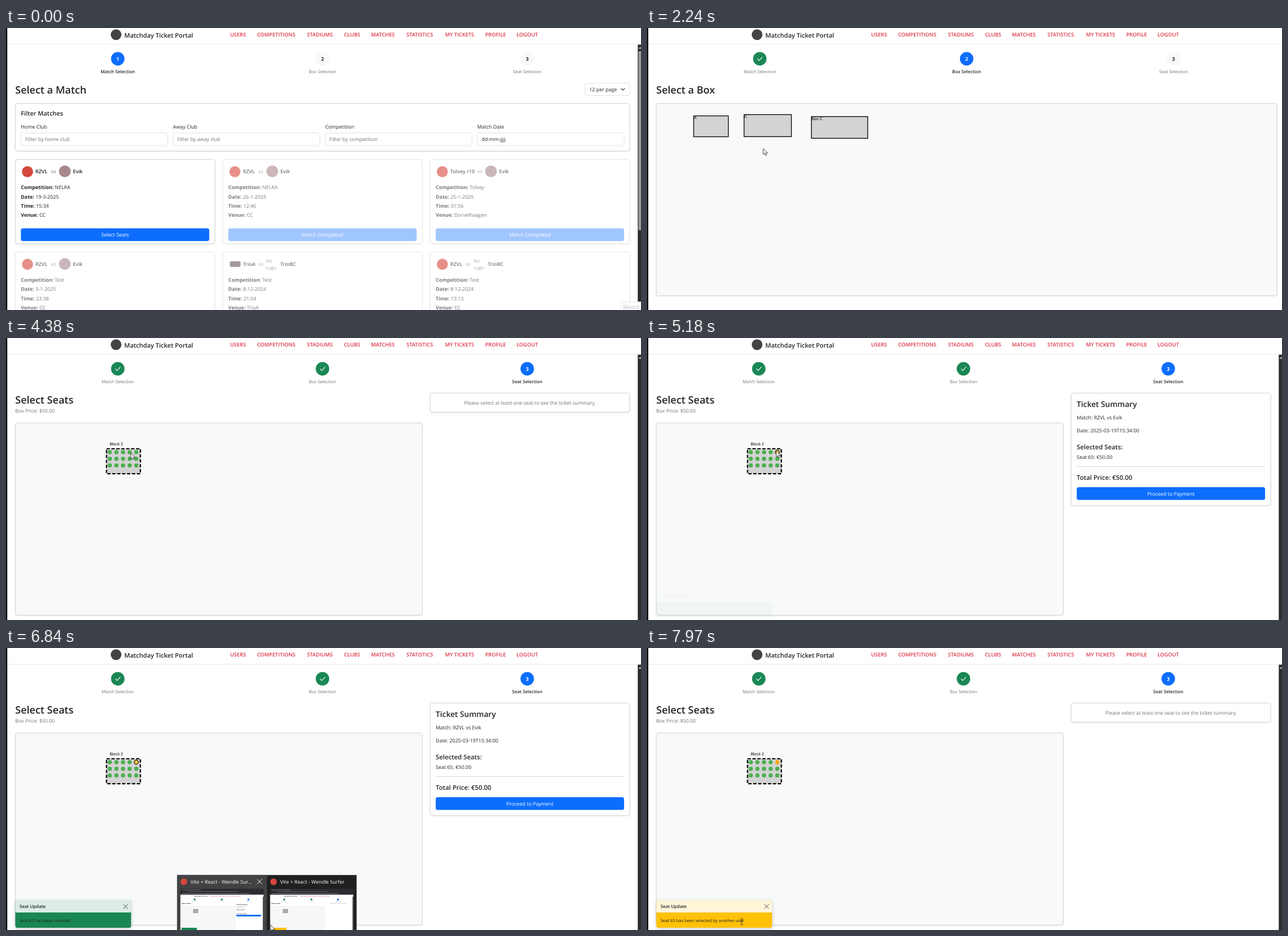
These frames come from a looping animation (1122 by 499 pixels, 8000 ms). An HTML page:

```html
<!DOCTYPE html>
<html lang="en">
<head>
<meta charset="utf-8">
<title>Ticket booking</title>
<style>
html, body { margin: 0; width: 100%; height: 100%; overflow: hidden; background: #fff; }
svg { display: block; width: 1122px; height: 499px; }
text { font: 8.9px "Open Sans", "Noto Sans", sans-serif; fill: #212529; text-rendering: geometricPrecision; white-space: pre; }
.m { text-anchor: middle; }
.sb { font-weight: 600; }
.b { font-weight: 700; }
.mute { fill: #6c757d; }
.white { fill: #fff; }
.nav { font-weight: 600; fill: #dc3545; }
.arial { font-family: "Liberation Sans", Arial, sans-serif; fill: #000; }
.card { fill: #fff; stroke: #d3d5d7; filter: drop-shadow(0 1px 1px rgba(0, 0, 0, .09)); }
.field { fill: #fff; stroke: #dee2e6; }
.line { fill: none; stroke-linecap: round; stroke-linejoin: round; }
.blue { fill: #0d6efd; }

/* One loop is 8 s, so 1% = 80 ms */
.step { animation: 8s step-end infinite; opacity: 0; }
.flow { animation: 8s linear infinite; }
.hint { animation-name: hint; }
.list { animation-name: list; }
.boxes { animation-name: boxes; }
.areas { animation-name: areas; }
.seats { animation-name: seats; }
.empty { animation-name: empty; }
.summary { animation-name: summary; }
.other { animation-name: other; }
.toast { opacity: 0; animation-name: toast; }
.hover { animation-name: hover; }
.pick { animation: pick 8s step-end infinite; }
.peek { opacity: 0; animation-name: peek; }
.left-on { animation-name: leftOn; }
.right-on { animation-name: rightOn; }
.pointer { animation-name: pointer; }
.path { animation-name: path; }
.arrow { animation-name: arrow; }
.hand { animation-name: hand; }
.beam { animation-name: beam; }

@keyframes hint { 0% { opacity: 1 } .875% { opacity: 0 } }
@keyframes list { 0% { opacity: 1 } 22.25% { opacity: 0 } }
@keyframes boxes { 22.25% { opacity: 1 } 38% { opacity: 0 } }
@keyframes areas { 23.125% { opacity: 1 } }
@keyframes seats { 38% { opacity: 1 } }
@keyframes empty { 0% { opacity: 1 } 64.75% { opacity: 0 } 87.875% { opacity: 1 } }
@keyframes summary { 64.75% { opacity: 1 } 87.875% { opacity: 0 } }
@keyframes other { 87.875% { opacity: 1 } }
@keyframes toast { 0%, 64.7% { opacity: 0 } 66.375%, 87.87% { opacity: 1 } 87.875%, 100% { opacity: 0 } }
@keyframes hover { 0%, 12.5% { fill: #0d6efd } 14.4%, 100% { fill: #0b5ed7 } }
@keyframes pick {
  0% { fill: #4caf50; stroke: none }
  64.75% { fill: #ffc833; stroke: #111 }
  87.875% { fill: #ffa500; stroke: none }
}
@keyframes peek {
  0%, 77.12% { opacity: 0; transform: translateY(10px) }
  77.125% { opacity: .38; transform: translateY(10px) }
  79.5%, 87.87% { opacity: 1; transform: none }
  87.875%, 100% { opacity: 0; transform: none }
}
@keyframes leftOn { 81% { opacity: 1 } 86.3% { opacity: 0 } }
@keyframes rightOn { 86.3% { opacity: 1 } }
@keyframes pointer { 4% { opacity: 1 } 65.625% { opacity: 0 } 80.5% { opacity: 1 } }
@keyframes arrow { 0% { opacity: 1 } 12.5% { opacity: 0 } 23.125% { opacity: 1 } 98.7% { opacity: 0 } }
@keyframes hand { 12.5% { opacity: 1 } 23.125% { opacity: 0 } }
@keyframes beam { 98.7% { opacity: 1 } }
@keyframes path {
  0%, 4% { transform: translate(972px, 462px) }
  4.75% { transform: translate(720px, 415px) }
  5.6%, 9% { transform: translate(531px, 370px) }
  11% { transform: translate(440px, 378px) }
  13% { transform: translate(330px, 373px) }
  16.3%, 27.1% { transform: translate(276px, 361px) }
  27.125% { transform: translate(240px, 285px) }
  28% { transform: translate(205.5px, 213.5px) }
  30% { transform: translate(196px, 199px) }
  32.5% { transform: translate(186px, 186px) }
  36.2%, 38% { transform: translate(185px, 176px) }
  50.6%, 53% { transform: translate(201px, 192px) }
  54.75% { transform: translate(220.5px, 203.5px) }
  63%, 72% { transform: translate(228.5px, 200px) }
  80% { transform: translate(400px, 497px) }
  82.5% { transform: translate(425px, 479px) }
  84% { transform: translate(450px, 484px) }
  85.5% { transform: translate(467.5px, 490px) }
  87.1%, 92% { transform: translate(474px, 487px) }
  93.5% { transform: translate(440px, 380px) }
  95% { transform: translate(380px, 311px) }
  97% { transform: translate(280px, 370px) }
  98.5% { transform: translate(190px, 470px) }
  99.6%, 100% { transform: translate(167.5px, 484.5px) }
}
</style>
</head>
<body>
<svg id="stage" viewBox="0 0 1122 499"></svg>
<script>
const text = (x, y, s, cls = '', size = 8.9) =>
  `<text x="${x}" y="${y}" class="${cls}" style="font-size:${size}px">${s}</text>`;
const rect = (x, y, w, h, attrs = '', r = 0) =>
  `<rect x="${x}" y="${y}" width="${w}" height="${h}" rx="${r}" ${attrs}/>`;
const circle = (x, y, r, attrs) => `<circle cx="${x}" cy="${y}" r="${r}" ${attrs}/>`;
const path = (d, color, width = 1) =>
  `<path d="${d}" class="line" stroke="${color}" stroke-width="${width}"/>`;
const group = (cls, ...parts) => `<g class="${cls}">${parts.join('')}</g>`;
const card = (x, y, w, h, attrs = '') => rect(x, y, w, h, `class="card" ${attrs}`, 3.5);
const cross = (x, y, r, color) =>
  path(`M${x - r} ${y - r}l${2 * r} ${2 * r}m0 ${-2 * r}l${-2 * r} ${2 * r}`, color);
const button = (x, y, label, cls = 'blue') =>
  rect(x, y, 332.8, 22.6, `class="${cls}"`, 3.5) + text(x + 166.4, y + 14.6, label, 'm white');

function header() {
  const items = [[410, 'USERS'], [477.5, 'COMPETITIONS'], [554.5, 'STADIUMS'], [611.5, 'CLUBS'],
    [666, 'MATCHES'], [731, 'STATISTICS'], [801.5, 'MY TICKETS'], [865, 'PROFILE'], [921, 'LOGOUT']];
  return rect(0, 28, 1122, 1.5, 'fill="#eceef0"') +
    circle(194.5, 11.8, 9.5, 'fill="#444"') +
    text(209, 16.5, 'Matchday Ticket Portal', 'sb', 11) +
    items.map(([x, s]) => text(x, 15.3, s, 'nav m', 9.2)).join('');
}

function steps(active, xs) {
  return ['Match', 'Box', 'Seat'].map((name, i) => {
    const x = xs[i], n = i + 1, on = n === active, done = n < active;
    const fill = done ? '#198754' : on ? '#0d6efd' : '#f8f9fa';
    return circle(x, 54.5, 11.9, `fill="${fill}"`) +
      (done ? path(`M${x - 4} 54.8l2.7 2.8 5.6-5.9`, '#fff', 1.1)
            : text(x, 57.8, n, 'm b ' + (on ? 'white' : ''), 8.8)) +
      text(x, 80, name + ' Selection', 'm ' + (on ? 'sb' : 'mute'), on ? 7.9 : 7.75);
  }).join('');
}

const scrollbar = thumb => rect(1116.3, 29, 6, 470, 'fill="#2c2c2c"') +
  '<path d="M1117.5 37l3-4 3 4z" fill="#aaa"/>' +
  (thumb ? rect(1117.6, 41, 6, 317, 'fill="#9e9e9e"', 2) : '');

function filters() {
  const fields = [['Home Club', 'Filter by home club'], ['Away Club', 'Filter by away club'],
    ['Competition', 'Filter by competition'], ['Match Date', 'dd-mm-jjjj']];
  return card(16.5, 133.5, 1085.5, 84) + text(26.3, 155, 'Filter Matches', 'sb', 10.9) +
    fields.map(([label, hint], i) => {
      const x = 26.3 + i * 268.8;
      return text(x, 177.5, label) + rect(x, 185.6, 259.5, 22.4, 'class="field"', 3.5) +
        text(x + 7.6, 200.3, hint, i < 3 ? 'mute' : '');
    }).join('');
}

const RED = '#d8473c', ROSE = '#a8888c';

// nameW is the room kept for the home name
function match(col, row, home, nameW, away, info) {
  const x = 16.5 + col * 366.5, y = 232.5 + row * 163.8, vs = x + 40 + nameW;
  const open = !col && !row;
  const badge = home === 'TrioA'
    ? rect(x + 12.5, y + 16.5, 19, 10, 'fill="#6d5252"', 3)
    : circle(x + 21.5, y + 21.8, 9.8, `fill="${RED}"`);
  const guest = away === 'Evik'
    ? circle(vs + 24.5, y + 21.2, 10.4, `fill="${ROSE}"`)
    : text(vs + 13.5, y + 18.8, 'No', 'mute', 8.1) + text(vs + 13.5, y + 31, 'Logo', 'mute', 8.1);
  const lines = ['Competition', 'Date', 'Time', 'Venue'].map((k, i) =>
    text(x + 9.8, y + 52.6 + i * 16.4, `<tspan class="b">${k}:</tspan> ${info[i]}`));
  return `<g opacity="${open ? 1 : .6}">` + card(x, y, 352.5, 149.3) + badge +
    text(x + 35.5, y + 24.8, home, 'sb') + text(vs, y + 24.8, 'vs', 'mute') + guest +
    text(vs + 38.7, y + 24.8, away, 'sb') + lines.join('') +
    (open ? button(x + 9.8, y + 122, 'Select Seats', 'flow hover')
          : `<g>${button(x + 9.8, y + 122, 'Match Completed" '.slice(0, 15), 'blue" opacity=".65')}</g>`) +
    '</g>';
}

const title = s => text(16.3, 116, s, 'sb', 18);
const WIDE = [197.5, 559.2, 921];

const listPage = group('step list',
  scrollbar(true), steps(1, WIDE), title('Select a Match'),
  rect(1023, 97.5, 79, 22, 'class="field"', 3.5), text(1030.5, 112, '12 per page'),
  path('M1087 107l3 3 3-3', '#343a40', 1.1), filters(),
  match(0, 0, 'RZVL', 23, 'Evik', ['NELRA', '19-3-2025', '15:34', 'CC']),
  match(1, 0, 'RZVL', 23, 'Evik', ['NELRA', '26-1-2025', '12:46', 'CC']),
  match(2, 0, 'Tolvey r10', 43, 'Evik', ['Tolvey', '25-1-2025', '01:56', 'Dorvelhaagen']),
  match(0, 1, 'RZVL', 23, 'Evik', ['Test', '5-1-2025', '23:38', 'CC']),
  match(1, 1, 'TrioA', 23, 'TrioBC', ['Test', '8-12-2024', '21:04', 'TrioA']),
  match(2, 1, 'RZVL', 23, 'TrioBC', ['Test', '8-12-2024', '13:13', 'CC']),
  group('step hint', rect(1086.5, 484.5, 40, 20, 'fill="#fcfcfc" stroke="#eee"'),
    `<g opacity=".3">${text(1090, 496.5, 'Record')}</g>`));

const area = (x, y, w, h, label) =>
  rect(x, y, w, h, 'fill="#d3d3d3" stroke="#000" stroke-width="1.3"') +
  text(x + .2, y + 5.8, label, 'arial', 7.2);

const boxPage = group('step boxes',
  steps(2, [199.3, 564.8, 930.2]), title('Select a Box'),
  card(16.5, 133.5, 1096.5, 340, 'style="fill:#f8f9fa"'),
  group('step areas', area(82.5, 155.5, 61.2, 37, 'A'), area(171.5, 153.3, 83.7, 39, 'C'),
    area(290.5, 156.7, 99.5, 38.5, 'Box C')));

function block() {
  let s = text(183.2, 189.8, 'Block 2', 'arial', 7.2) +
    rect(177.6, 196, 59.8, 44.2, 'fill="#d3d3d3" stroke="#000" stroke-width="2.2" stroke-dasharray="5.8 2.9"');
  for (let i = 0; i < 15; i++)
    s += circle(183.4 + i % 5 * 11.7, 202 + Math.floor(i / 5) * 11.7, 3.7,
      i === 4 ? 'class="pick" stroke-width="1.2"' : 'fill="#4caf50"');
  return s;
}

function toast(body, head, msg) {
  return rect(16.5, 446, 204.5, 49, `fill="${body}" style="filter:drop-shadow(0 2px 3px rgba(0,0,0,.2))"`, 3.5) +
    `<path d="M16.5 468V449.5q0-3.5 3.5-3.5H217.5q3.5 0 3.5 3.5V468z" fill="${head}"/>` +
    text(24, 460.4, 'Seat Update', 'sb', 7.8) + cross(211.3, 457.4, 3.7, '#444') +
    text(24, 485, msg, '', 7.5);
}

const seatPage = group('step seats',
  scrollbar(false), steps(3, WIDE), title('Select Seats'),
  text(16.3, 132, 'Box Price: $50.00', 'mute', 8.75),
  card(16.5, 150.5, 719, 339.8, 'style="fill:#f8faf9"'), block(),
  group('step empty', card(749.5, 97.5, 352.5, 33.7),
    text(925.8, 117.8, 'Please select at least one seat to see the ticket summary.', 'm mute', 8.83)),
  group('step summary', card(749.5, 97.5, 352.5, 198.7),
    text(759.3, 121.5, 'Ticket Summary', 'sb', 13.7),
    text(759.3, 144, 'Match: RZVL vs Evik'), text(759.3, 167.3, 'Date: 2025-03-19T15:34:00'),
    text(759.3, 196.7, 'Selected Seats:', 'sb', 11.3), text(759.3, 214.3, 'Seat 65: €50.00'),
    rect(759.3, 227, 332.8, 1, 'fill="#d6d8da"'),
    text(759.3, 250.7, 'Total Price: €50.00', 'sb', 11.3), button(759.3, 264, 'Proceed to Payment')),
  group('flow toast', toast('#198754', '#dcece4', 'Seat 65 has been selected')),
  group('step other', toast('#ffc107', '#fef5d9', 'Seat 65 has been selected by another user')));

// Miniature browser window inside the task switcher
function mini(x, mine) {
  const side = mine
    ? text(x + 99, 454.5, 'Ticket Summary', 'b', 2.4) + text(x + 99, 458.5, 'Match: RZVL vs Evik', '', 1.7) +
      text(x + 99, 464, 'Selected Seats:', 'b', 2) + text(x + 99, 470.5, 'Total Price: €50.00', 'b', 2) +
      rect(x + 99, 472, 43.5, 3, 'class="blue"')
    : text(x + 120, 453, 'Please select at least one seat.', 'm mute', 2.1);
  return rect(x, 426, 147, 10.5, 'fill="#2b2c2f"') + rect(x + 2, 426.8, 34, 2.4, 'fill="#4a4b4f"') +
    rect(x + 12, 430, 90, 2, 'fill="#47494d"') +
    path(`M${x + 3} 434.6h118`, '#8b8d91', .8) +
    rect(x, 436.5, 147, 63, 'fill="#fff"') + rect(x + 145.6, 440, 1.4, 60, 'fill="#333"') +
    text(x + 25, 439.7, 'Matchday Ticket Portal', 'b', 2) +
    text(x + 53, 439.6, 'USERS  COMPETITIONS  STADIUMS  CLUBS  MATCHES  LOGOUT', 'nav', 1.8) +
    [25, 73, 120].map((d, i) => circle(x + d, 445, 1.7, `fill="${i < 2 ? '#198754' : '#0d6efd'}"`) +
      path(`M${x + d - 4} 448.6h8`, '#aaa', .5)).join('') +
    text(x + 2, 453, 'Select Seats', 'b', 2.7) +
    rect(x + 2, 457.5, 94, 44, 'fill="#f6f8f7" stroke="#ddd" stroke-width=".4"') +
    rect(x + 23, 462.5, 8, 6, 'fill="#aaa" stroke="#333" stroke-width=".5" stroke-dasharray=".8 .4"') + side +
    rect(x + 2, 495, 27, 5, `fill="${mine ? '#198754' : '#ffc107'}"`);
}

function tab(x, w, mine) {
  const label = s => text(x + 23.4, 417, 'Vite + React - ' + s, 'white', 8.8);
  const icon = circle(x + 11.7, 413.6, 5.8, `fill="${RED}"`);
  return rect(x, 401.7, w, 98, 'fill="#202022"') + icon + label('Wendle Surfer') +
    group('step ' + (mine ? 'left-on' : 'right-on'), rect(x, 401.7, w, 98, 'fill="#424244"'), icon,
      label('Wendle Sur...'), cross(x + 145.5, 413.3, 4, '#fff')) +
    mini(x + 5.7, mine);
}

const peek = group('flow peek', tab(302.5, 158.5, true), tab(461, 158.5, false));

const cursorStyle = 'fill="#fff" stroke="#222" stroke-width=".85" stroke-linejoin="round"';
const cursor = group('step pointer', group('flow path',
  group('step arrow', `<path d="M0 0V10.5L2.4 8.2 4.1 12 5.9 11.2 4.2 7.6H7.5Z" ${cursorStyle}/>`),
  group('step hand', `<path d="M-1.2 1Q0-.6 1.2 1V5L4.6 5.8Q5.8 6.2 5.5 8.5L4.6 12.6H-.8L-3.6 8.8Q-3.6 6.8-1.2 8.2Z" ${cursorStyle}/>`),
  group('step beam', path('M-2-5.3Q0-5.3 0-4.3Q0-5.3 2-5.3M0-4.3V4.3M-2 5.3Q0 5.3 0 4.3Q0 5.3 2 5.3', '#222', .9))));

document.getElementById('stage').innerHTML =
  rect(0, 0, 1122, 499, 'fill="#fff"') + listPage + boxPage + seatPage + header() +
  rect(0, 0, 2.2, 499, 'fill="#000"') + peek + cursor;
</script>
</body>
</html>
```
